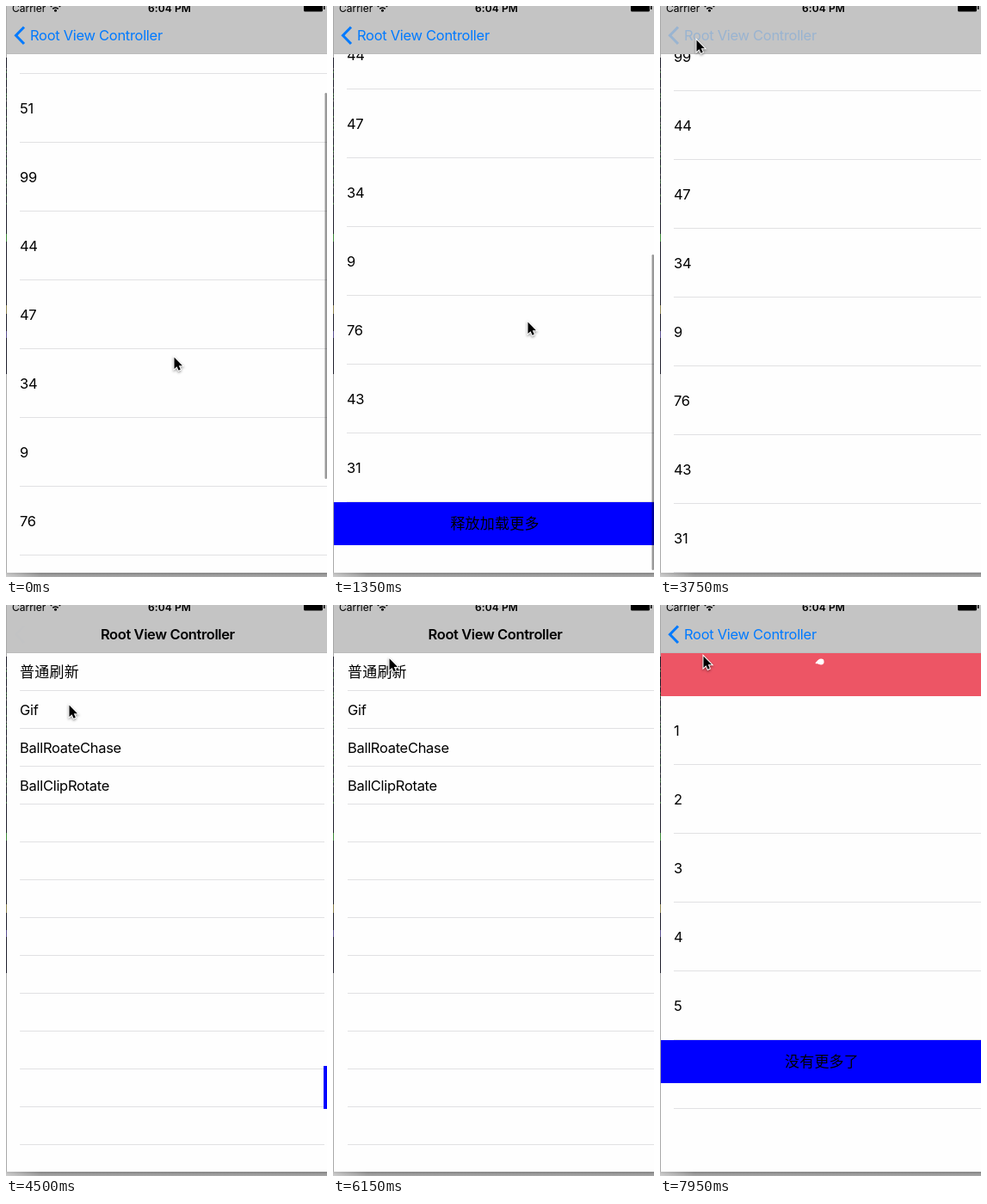
Write an HTML page with a canvas that moves like this. It is 373 px wide and 664 px high and loops after 8 s.

```html
<!DOCTYPE html>
<html lang="zh-CN">
<head>
<meta charset="utf-8">
<style>
html, body { margin: 0; width: 100%; height: 100%; overflow: hidden; background: #fff; }
canvas { display: block; width: 373px; height: 664px; }
</style>
</head>
<body>
<canvas id="stage"></canvas>
<script>
const W = 373, H = 664, TOP = 56, BOTTOM = 659, LOOP = 8000;
const BLUE = '#007aff', LINE = '#e1e1e3';
const SANS = 'Inter, "Noto Sans CJK SC", "Noto Sans CJK", sans-serif';
const CJK = '"Noto Sans CJK SC", "Noto Sans CJK", sans-serif';
const canvas = document.getElementById('stage');
const c = canvas.getContext('2d');
const dpr = window.devicePixelRatio || 1;
canvas.width = W * dpr;
canvas.height = H * dpr;

const lerp = (a, b, u) => a + (b - a) * u;
const clamp = u => Math.max(0, Math.min(1, u));
const smooth = u => u * u * (3 - 2 * u);
const easeOut = u => 1 - (1 - u) ** 4;

// Keys are [time, value, value, ...], in order of time.
function track(keys, t, ease = smooth) {
  let i = 0;
  while (i < keys.length - 2 && t >= keys[i + 1][0]) i++;
  const [a, b] = [keys[i], keys[i + 1]];
  const u = ease(clamp((t - a[0]) / (b[0] - a[0])));
  return a.slice(1).map((v, k) => lerp(v, b[k + 1], u));
}

const pushKeys = [[0, 1], [3800, 1], [4250, 0], [4500, 0], [5000, 1],
  [5550, 1], [6050, 0], [6920, 0], [7430, 1]];
const scrollKeys = [[0, 57], [450, 150], [900, 197], [1350, 279], [1500, 279],
  [1800, 247], [3300, 247], [3600, 197]];
const cursorKeys = [[0, 195, 408], [450, 205, 340], [900, 215, 490], [1350, 226, 367],
  [1500, 226, 367], [2100, 231, 387], [2250, 231, 387], [3100, 42, 39], [3850, 42, 39],
  [4400, 72, 116], [4600, 74, 116], [5250, 75, 95], [5500, 44, 39], [5900, 44, 39],
  [6850, 166, 171], [7150, 166, 171], [7950, 50, 59]];

const numbers = [8, 51, 99, 44, 47, 34, 9, 76, 43, 31];
const menu = ['普通刷新', 'Gif', 'BallRoateChase', 'BallClipRotate'];

function rect(x, y, w, h, color) {
  c.fillStyle = color;
  c.fillRect(x, y, w, h);
}

function text(s, x, y, { size = 16.5, weight = 400, color = '#000', align = 'left', gap = -0.3, family = SANS } = {}) {
  c.font = `${weight} ${size}px ${family}`;
  c.letterSpacing = gap + 'px';
  c.textAlign = align;
  c.fillStyle = color;
  c.fillText(s, x, y);
}

const cjk = (s, x, y, align) => text(s, x, y, { size: 17, gap: 0.2, align, family: CJK });

function dot(x, y, r) {
  c.beginPath();
  c.arc(x, y, r, 0, 7);
  c.fill();
}

function bezier(x, x1, y1, x2, y2) {
  const at = (u, a, b) => 3 * u * (1 - u) ** 2 * a + 3 * u * u * (1 - u) * b + u ** 3;
  let lo = 0, hi = 1;
  for (let i = 0; i < 20; i++) {
    const mid = (lo + hi) / 2;
    at(mid, x1, x2) < x ? lo = mid : hi = mid;
  }
  return at(lo, y1, y2);
}

function chase(x, y, t) {
  const u = (t % 1500) / 1500;
  c.fillStyle = '#fff';
  for (let i = 0; i < 5; i++) {
    const k = i / 5, p = bezier(u, 0.5, 0.15 + k, 0.25, 1);
    const a = (p - 0.25) * 2 * Math.PI;
    dot(x + 15 * Math.cos(a), y + 15 * Math.sin(a), 3.5 * lerp(1 - k, 0.2 + k, p));
  }
}

function spinner(x, y, t) {
  const step = Math.floor(t / 1000 * 12);
  c.lineWidth = 2;
  c.lineCap = 'round';
  for (let i = 0; i < 12; i++) {
    const a = (i / 12) * 2 * Math.PI, age = (((step - i) % 12) + 12) % 12;
    c.strokeStyle = `rgba(225,225,235,${Math.max(0.3, 1 - age * 0.1)})`;
    c.beginPath();
    c.moveTo(x + 5.5 * Math.cos(a), y + 5.5 * Math.sin(a));
    c.lineTo(x + 9 * Math.cos(a), y + 9 * Math.sin(a));
    c.stroke();
  }
}

function footer(y, label) {
  rect(0, y, W + 1, 50, '#00f');
  if (label) cjk(label, 188, y + 31, 'center');
}

function rows(items, top, height, x, count) {
  for (let i = 0; i < count; i++) {
    const y = top + i * height;
    rect(x, y + height - 1, W, 1, LINE);
    if (i >= items.length) continue;
    const s = String(items[i]);
    s.charCodeAt(0) > 255 ? cjk(s, x, y + height / 2 + 6) : text(s, x, y + height / 2 + 6);
  }
}

function numberList(t) {
  const [scroll] = track(scrollKeys, t), top = TOP - scroll;
  const over = Math.max(0, scroll - 197);
  rows(numbers, top, 80, 16, 10);
  const loading = t >= 1500;
  footer(top + 800, loading ? '' : over > 50 ? '释放加载更多' : '上拉加载更多');
  if (loading) spinner(188, top + 825, t);
  const fade = 1 - clamp((t - 1850) / 270);
  if (fade > 0) {
    const len = 449 - over;
    const y = over ? 656 - len : TOP + 2 + scroll * 0.754;
    c.fillStyle = `rgba(0,0,0,${0.4 * fade})`;
    c.beginPath();
    c.roundRect(370.5, y, 2.5, len, 1.2);
    c.fill();
  }
}

function shortList(offset) {
  const top = TOP + offset;
  rows([1, 2, 3, 4, 5], top, 80, 16, 7);
  footer(top + 400, '没有更多了');
}

function gifList() {
  shortList(80);
  c.fillStyle = '#fbea0c';
  c.beginPath();
  c.roundRect(167.5, 100, 42, 27, 13);
  c.fill();
}

function chaseList(t) {
  shortList(50);
  rect(0, TOP, W + 1, 50, '#ed5565');
  chase(188, 81, t - 6920);
}

function pages(t, p) {
  c.save();
  c.beginPath();
  c.rect(1, TOP, W - 1, BOTTOM - TOP);
  c.clip();
  rect(0, TOP, W, H, '#fefefe');
  if (p < 1) {
    c.save();
    c.translate(-112 * p, 0);
    rows(menu, TOP, 44, 17, 14);
    c.restore();
    rect(0, TOP, W, H, `rgba(0,0,0,${0.1 * p})`);
  }
  if (p > 0) {
    c.translate((W - 1) * (1 - p), 0);
    rect(1, TOP, W, H, '#fefefe');
    if (t < 4400) numberList(t);
    else if (t < 6500) gifList();
    else chaseList(t);
  }
  c.restore();
}

function statusBar() {
  text('Carrier', 7, 7, { size: 12, gap: 0 });
  text('6:04 PM', 190, 7, { size: 12, weight: 600, gap: 0.1, align: 'center' });
  c.strokeStyle = '#000';
  c.lineCap = 'butt';
  c.lineWidth = 1.6;
  for (const r of [4.5, 8]) {
    c.beginPath();
    c.arc(57.5, 6.5, r, -Math.PI * 0.75, -Math.PI * 0.25);
    c.stroke();
  }
  c.fillStyle = '#000';
  dot(57.5, 5.3, 1.5);
  c.beginPath();
  c.roundRect(346, -3, 22, 9.5, 1.5);
  c.fill();
  rect(369, 0, 1.5, 4, '#000');
}

function navBar(t, p) {
  rect(1, 0, W, TOP, '#c4c4c4');
  rect(1, TOP - 1, W, 1, '#bcbcbc');
  statusBar();
  const title = 'Root View Controller';
  const pressed = (t >= 3600 && t < 4250) || (t >= 5470 && t < 6050);
  c.globalAlpha = 1 - p;
  text(title, lerp(188.5, 106, p), 40, { weight: 600, gap: -0.4, align: 'center' });
  c.globalAlpha = p * (pressed ? 0.22 : 1);
  text(title, lerp(110, 28, p), 40, { color: BLUE });
  c.strokeStyle = BLUE;
  c.lineWidth = 3;
  c.lineCap = 'butt';
  c.beginPath();
  c.moveTo(21, 24.5);
  c.lineTo(11.5, 34.2);
  c.lineTo(21, 44);
  c.stroke();
  c.globalAlpha = 1;
}

function surroundings() {
  rect(0, 0, 1, H, '#a9a9a9');
  rect(0, 60, 1, 368, '#20202c');
  for (let i = 0; i < 24; i++) {
    const y = 72 + i * 6.7 + 3 * Math.sin(i * 5);
    rect(0, y, 1, 2, i % 3 ? '#3d6b3c' : '#555');
  }
  rect(0, 265, 1, 9, '#3f8a3a');
  rect(0, 348, 1, 10, '#8d8250');
  rect(0, 378, 1, 8, '#5a5090');
  const g = c.createLinearGradient(0, BOTTOM, 0, H);
  g.addColorStop(0, '#858585');
  g.addColorStop(1, '#aaaaaa');
  rect(0, BOTTOM, W, H - BOTTOM, g);
  const side = c.createLinearGradient(0, 0, 40, 0);
  side.addColorStop(0, 'rgba(255,255,255,.45)');
  side.addColorStop(1, 'rgba(255,255,255,0)');
  rect(0, BOTTOM, 40, H - BOTTOM, side);
}

const arrow = new Path2D('M.5 .5V14L3.6 11.2 5.6 15.8 7.8 14.8 5.8 10.3H10Z');

function cursor(t) {
  const [x, y] = track(cursorKeys, t);
  c.save();
  c.translate(x, y);
  c.shadowColor = 'rgba(0,0,0,.4)';
  c.shadowBlur = 3 * dpr;
  c.shadowOffsetY = 1.5 * dpr;
  c.strokeStyle = '#fff';
  c.lineWidth = 2;
  c.stroke(arrow);
  c.shadowColor = 'transparent';
  c.fillStyle = '#000';
  c.fill(arrow);
  c.restore();
}

function draw(t) {
  const [p] = track(pushKeys, t, easeOut);
  c.setTransform(dpr, 0, 0, dpr, 0, 0);
  surroundings();
  pages(t, p);
  navBar(t, p);
  cursor(t);
}

const start = performance.now();
function frame() {
  draw((performance.now() - start) % LOOP);
  requestAnimationFrame(frame);
}
frame();
</script>
</body>
</html>
```
